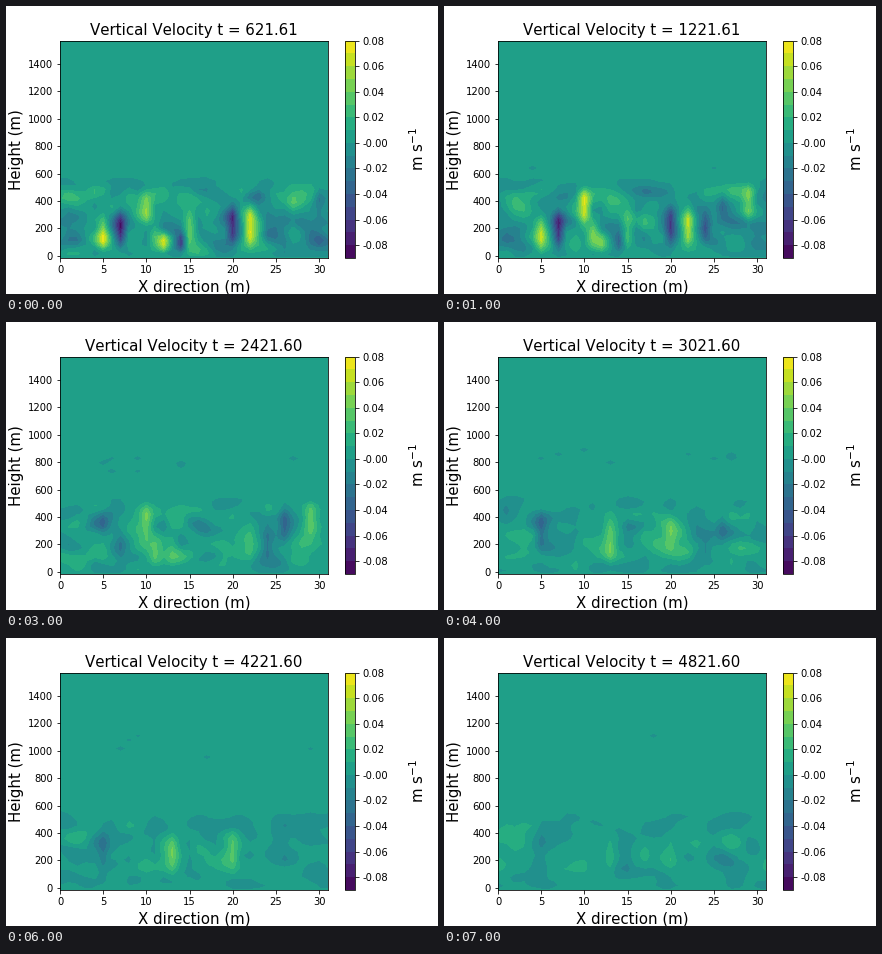
Recreate the animation shown at these times as a matplotlib script. Size 432 px wide and 288 px high, loop 8 s.

```python
import numpy as np
import matplotlib.pyplot as plt
from matplotlib.animation import FuncAnimation

DPI = 72
STEPS = 8
X = np.arange(32)
Z = -15.9 + 31.25 * np.arange(52)
TOP = 1570
CALM = 0.0006  # still air aloft

LEVELS = np.arange(-9, 9) / 100
LEVELS[9] = -1e-12

# Main plumes: x, height, speed in cm/s, step of greatest strength
PLUMES = [
    (5, 160, 6.4, 0.4), (7, 190, -8.4, 0.7), (10, 370, 7.8, 1.4),
    (11, 140, 5.5, 1.5), (12, 90, 7.2, -0.5), (14, 95, -8, -0.5),
    (15, 200, 6, 0.2), (20, 220, -8.4, 0.4), (22, 220, 8.2, 0.4),
    (24, 230, -5, 1.5), (26, 350, -4.5, 2.5), (29, 400, 5.5, 1.9),
    (5, 290, -4, 4.8), (13, 240, 5, 4.8), (20, 260, 4.2, 5.2),
]
LIFE = 1.9


def smooth(a, axis):
    return (np.roll(a, 1, axis) + 2 * a + np.roll(a, -1, axis)) / 4


def eddies(seed):
    a = np.random.default_rng(seed).normal(size=(len(Z), len(X)))
    for axis in (0, 0, 0, 1):
        a = smooth(a, axis)
    return a / a.std()


def turbulence(i):
    """Slowly decaying eddies that share half their shape with the next step."""
    strength = 0.012 * np.exp(-i / 9)
    return strength * (eddies(i) + eddies(i + 1)) / np.sqrt(2)


def plume(i, x, z, speed, peak):
    half = min(140, 0.75 * z)
    column = np.exp(-np.abs((Z - z) / half) ** 3)
    row = np.exp(-((X - x) / (0.75 + 0.03 * i)) ** 2)
    fade = np.exp(-((i - peak) / LIFE) ** 2)
    return speed / 100 * fade * np.outer(column, row)


def add_ripples(w, i):
    """Faint sinking spots that climb through the calm air."""
    rng = np.random.default_rng(90 + i)
    for _ in range(int(9 * np.sin(np.pi * i / 7.5))):
        z = max(625, rng.normal(500 + 90 * i, 40))
        w[np.abs(Z - z).argmin(), rng.integers(1, 31)] = -rng.uniform(0.0004, 0.0015)


def velocity(i):
    w = sum(plume(i, *p) for p in PLUMES) + turbulence(i) + 0.0004 * i
    w = np.clip(w, -0.087, 0.0785 + 0.003 * np.exp(-3 * i))
    ground = 1 - np.exp(-(Z - Z[0]) / 30)
    lid = 1 / (1 + np.exp((Z - 505) / 18))
    w = CALM + (ground * lid)[:, None] * w
    add_ripples(w, i)
    return w


def draw_field(i):
    return ax.contourf(X, Z, velocity(i), LEVELS, cmap="viridis",
                       vmin=LEVELS[0], vmax=LEVELS[-1])


plt.rcParams["font.family"] = "DejaVu Sans"
plt.rcParams["font.size"] = 10
plt.rcParams["text.kerning_factor"] = 6
fig = plt.figure(figsize=(432 / DPI, 288 / DPI), dpi=DPI, facecolor="white")
ax = fig.add_axes([0.125, 0.125, 0.62, 0.755])
cax = fig.add_axes([338.6 / 432, 0.125, 10.87 / 432, 0.755])

ax.set_xlim(0, 31)
ax.set_ylim(Z[0], TOP)
ax.set_xticks(range(0, 31, 5))
ax.set_yticks(range(0, 1401, 200))
ax.set_xlabel("X direction (m)", fontsize=15)
ax.set_ylabel("Height (m)", fontsize=15)
title = ax.set_title("", fontsize=15)

field = draw_field(0)
bar = fig.colorbar(field, cax=cax)
bar.set_ticks(LEVELS[1::2], labels=[f"{v:.2f}" for v in LEVELS[1::2]])
bar.set_label("m s$^{-1}$", fontsize=15, labelpad=20)


def update(i):
    global field
    field.remove()
    field = draw_field(i)
    title.set_text(f"Vertical Velocity t = {621.6115 + 599.9978 * i:.2f}")
    return []


anim = FuncAnimation(fig, update, frames=STEPS, interval=1000,
                     init_func=lambda: [], repeat=True, repeat_delay=0,
                     blit=False)
plt.show()
```
